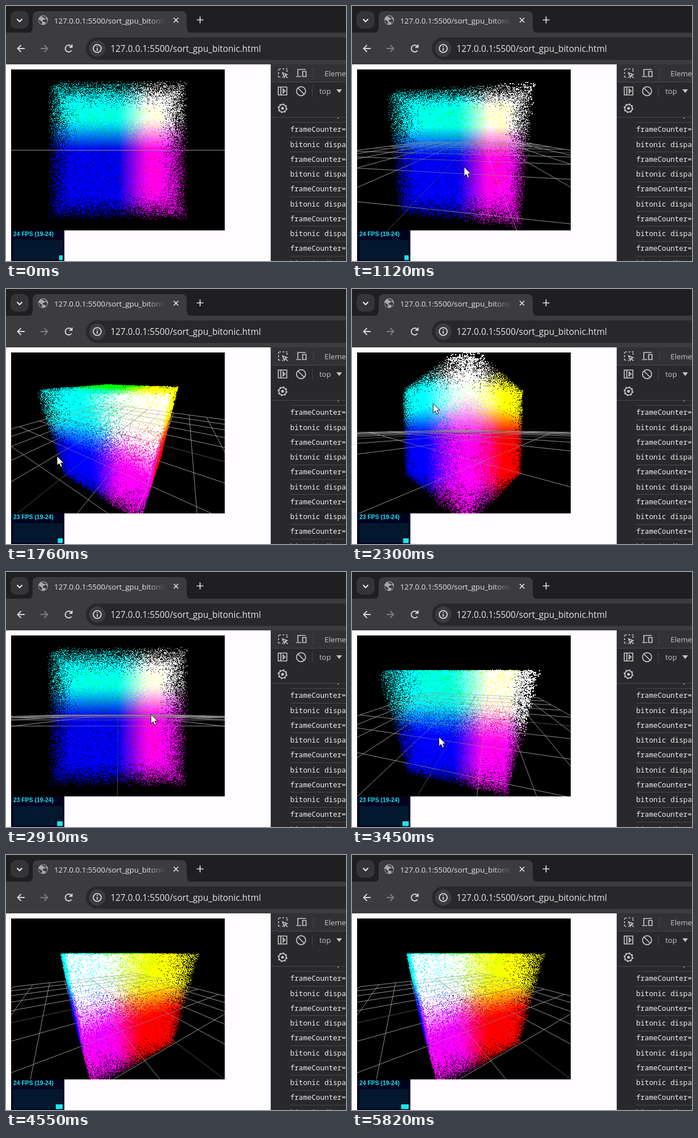
Recreate the animation shown at these times as an HTML page with a canvas. Size 600x450 px, loop 5880 ms.

```html
<!DOCTYPE html>
<html lang="en">
<head>
<meta charset="utf-8">
<title>Bitonic sort</title>
<style>
html, body { margin: 0; width: 100%; height: 100%; overflow: hidden; background: #fffdff; }
svg, canvas { position: absolute; left: 0; top: 0; }
#view { left: 9px; top: 112px; }
text { font-family: "Open Sans", "Noto Sans", sans-serif; fill: #e6e6e8; white-space: pre; }
.mono { font: 500 12.6px "Noto Sans Mono", "DejaVu Sans Mono", monospace; fill: #f0f0f2; }
.line { fill: none; stroke: #c7c7c9; stroke-width: 1.7; }
.rule { stroke: #48484b; stroke-width: 1; }
#fps { font: bold 10.4px "Liberation Sans", Arial, sans-serif; fill: #1de4ea; }
</style>
</head>
<body>
<svg width="600" height="450">
  <defs>
    <linearGradient id="fade" gradientUnits="userSpaceOnUse" x1="250" x2="281" y1="0" y2="0">
      <stop stop-color="#e6e6e8"/><stop offset="1" stop-color="#3c3b3d"/>
    </linearGradient>
  </defs>

  <!-- tab strip -->
  <rect width="600" height="48" fill="#1f1f21"/>
  <rect x="8" y="9" width="32" height="31" rx="10" fill="#353537"/>
  <path class="line" d="M19.5 23l4.5 4.5 4.5-4.5" style="stroke:#eee;stroke-width:2"/>
  <path d="M37 48q10 0 10-10V19q0-10 10-10H309q10 0 10 10V38q0 10 10 10z" fill="#3c3b3d"/>
  <circle cx="65.5" cy="25" r="8.5" fill="#aaabae"/>
  <path d="M58.5 24l5 4v4l-3-1-3-5zM62 18l4-.5 5 2-2 4-4 1v3l5 1-1 4 4-5-1-4" fill="#3c3b3d"/>
  <text x="85" y="30.5" font-size="13.3" style="fill:url(#fade)">127.0.0.1:5500/sort_gpu_bitonic</text>
  <path class="line" d="M296 21l8 8m0-8l-8 8M336.5 24.5h12m-6-6v12" style="stroke:#e3e3e5"/>

  <!-- toolbar -->
  <rect y="47" width="600" height="56" fill="#3c3b3d"/>
  <path class="line" d="M33 75H20.5m6-6l-6 6 6 6" style="stroke:#d9d9db;stroke-width:1.9"/>
  <path class="line" d="M61 75h12.5m-6-6l6 6-6 6" style="stroke:#7d7d80;stroke-width:1.9"/>
  <path class="line" d="M115.5 78.5a6 6 0 1 1-1-8l2 2m0-4.5v4.8h-4.8" style="stroke:#d9d9db;stroke-width:1.9"/>
  <rect x="141" y="55.5" width="520" height="39.5" rx="19.7" fill="#28282a"/>
  <circle cx="161" cy="75" r="14.5" fill="#3c3b3d"/>
  <circle class="line" cx="161" cy="75" r="7" style="stroke:#e3e3e5"/>
  <path class="line" d="M161 74v5m0-8.5v1.8" style="stroke:#e3e3e5"/>
  <text x="184.5" y="81" font-size="15.4">127.0.0.1:5500/sort_gpu_bitonic.html</text>

  <!-- developer panel -->
  <rect x="467" y="103" width="133" height="347" fill="#29292b"/>
  <g id="log"></g>
  <rect x="468" y="103" width="132" height="93" fill="#29292b"/>
  <rect x="468" y="103" width="132" height="31" fill="#323234"/>
  <path class="rule" d="M467.5 103V450M468 134.5H600M468 196.5H600M542.5 109v19M540.5 141v19"/>
  <path class="line" d="M496 116v-5h-2m-3 0h-3m-3 0h-4v3m0 3v3m0 3v3h3m3 0h2" stroke-dasharray="3 1.5"/>
  <path class="line" d="M488 118l3 8 1.5-3.5 3.5-1.5zM492 122l5 5"/>
  <path class="line" d="M515 123v-11h14M512 124.5h9M523.5 115.5h6v9h-6z"/>
  <path class="line" d="M480.5 143h15v14h-15zM485 143v14M489 146.5l3.5 3.5-3.5 3.5z"/>
  <path class="line" d="M515 144.5l11.5 11.5"/>
  <circle class="line" cx="520.7" cy="150.3" r="8"/>
  <circle class="line" cx="488" cy="180.5" r="6.5"/>
  <circle class="line" cx="488" cy="180.5" r="7.7" stroke-dasharray="3 3.05"/>
  <circle cx="488" cy="180.5" r="2.5" fill="#c7c7c9"/>
  <text x="562" y="123.5" font-size="13.3" style="fill:#c7c7c9">Elements</text>
  <text x="553" y="155" font-size="13" style="fill:#c7c7c9">top</text>
  <path d="M583 147h10l-5 6.5z" fill="#c7c7c9"/>

  <!-- frame rate panel -->
  <rect x="9" y="395" width="94" height="55" fill="#020220"/>
  <text id="fps" x="13" y="406.3"></text>
  <rect x="13" y="413" width="87" height="35" fill="#03172f"/>
  <rect id="bar" y="440" height="8.5" fill="#1de4ea"/>
</svg>
<canvas id="view" width="377" height="284"></canvas>
<svg width="600" height="450">
  <path id="cursor" d="M0 0V16.5L3.8 13 6.5 19 9.3 17.8 6.7 12H11.8Z" fill="#fff" stroke="#111" stroke-width="1"/>
</svg>
<script>
const LOOP = 5880, W = 377, H = 284, CX = 188.5, CY = 142.5;
const FOCAL = H / 2 / Math.tan(37.5 * Math.PI / 180), DIST = 5, HALF = 2, COUNT = 262144;
const $ = id => document.getElementById(id);

// time, yaw, elevation (degrees)
const orbit = [
  [820, 0, 0], [1120, 8, 8.5], [1420, 18, 18], [1760, 30, 27.5], [2000, 37, 21],
  [2300, 43.4, 2.9], [2500, 38, 0.5], [2640, 21, 0.5], [2910, 0, 1.3],
  [3210, 3, 15], [3500, 15, 25], [4000, 45, 25], [4420, 61.5, 24]
];
// time, x, y
const pointer = [
  [820, 215, 258], [1120, 198, 284], [1760, 90, 295], [2000, 95, 285], [2300, 143, 202],
  [2600, 210, 205], [2910, 256, 251], [3210, 200, 285], [4000, 47, 305], [4420, 14, 305]
];

function sample(keys, t) {
  const i = keys.findIndex(k => k[0] > t);
  if (i < 0) return keys[keys.length - 1].slice(1);
  if (i === 0) return keys[0].slice(1);
  const a = keys[i - 1], b = keys[i], u = (t - a[0]) / (b[0] - a[0]);
  return [1, 2].map(n => a[n] + (b[n] - a[n]) * u);
}

// random points in a cube, coloured by clamped position
let seed = 7;
const random = () => (seed = (Math.imul(seed, 1664525) + 1013904223) >>> 0) / 4294967296;
const pos = Float32Array.from({ length: COUNT * 3 }, () => (random() * 2 - 1) * HALF);
const level = v => Math.round(Math.min(1, Math.max(0, v)) * 255);
const tint = Uint32Array.from({ length: COUNT }, (_, i) =>
  (255 << 24 | level(pos[i * 3 + 2]) << 16 | level(pos[i * 3 + 1]) << 8 | level(pos[i * 3])) >>> 0);

const ctx = $("view").getContext("2d");
const layer = document.createElement("canvas");
layer.width = W;
layer.height = H;
const layerCtx = layer.getContext("2d");
const image = layerCtx.createImageData(W, H);
const pixels = new Uint32Array(image.data.buffer);
const zbuf = new Float32Array(W * H);

function drawPoints(sy, cy, se, ce) {
  pixels.fill(0);
  zbuf.fill(99);
  for (let i = 0, j = 0; i < COUNT; i++, j += 3) {
    const x = pos[j], y = pos[j + 1], z = pos[j + 2];
    const f = x * sy + z * cy, depth = DIST - f * ce - y * se, k = FOCAL / depth;
    const size = depth < 2.6 ? 2 : 1;
    const px = Math.floor(CX + (x * cy - z * sy) * k);
    const py = Math.floor(CY - (y * ce - f * se) * k);
    for (let v = py; v < py + size; v++) {
      if (v < 0 || v >= H) continue;
      for (let u = px; u < px + size; u++) {
        const n = v * W + u;
        if (u >= 0 && u < W && depth < zbuf[n]) {
          zbuf[n] = depth;
          pixels[n] = tint[i];
        }
      }
    }
  }
  layerCtx.putImageData(image, 0, 0);
}

function drawGrid(g, sy, cy, se, ce) {
  const toCamera = (x, z) => {
    const f = x * sy + z * cy;
    return [x * cy - z * sy, -f * se, DIST - f * ce];
  };
  const segment = (a, b) => {
    if (a[2] > b[2]) [a, b] = [b, a];
    const near = 0.05;
    if (b[2] <= near) return;
    if (a[2] < near) {
      const u = (near - a[2]) / (b[2] - a[2]);
      a = a.map((v, i) => v + (b[i] - v) * u);
    }
    g.beginPath();
    for (const p of [a, b]) g.lineTo(CX + p[0] * FOCAL / p[2], CY - p[1] * FOCAL / p[2]);
    g.stroke();
  };
  for (let i = -5; i <= 5; i++) {
    g.strokeStyle = i ? "#929292" : "#4c4c4c";
    segment(toCamera(i, -5), toCamera(i, 5));
    segment(toCamera(-5, i), toCamera(5, i));
  }
}

function drawScene(yaw, tilt) {
  const view = [Math.sin(yaw), Math.cos(yaw), Math.sin(tilt), Math.cos(tilt)];
  ctx.fillStyle = "#000";
  ctx.fillRect(0, 0, W, H);
  drawGrid(ctx, ...view);
  drawPoints(...view);
  // the grid shows faintly through the cloud
  layerCtx.globalCompositeOperation = "source-atop";
  layerCtx.globalAlpha = 0.55;
  drawGrid(layerCtx, ...view);
  ctx.drawImage(layer, 0, 0);
}

let log = "";
for (let i = 0; i < 11; i++) {
  const y = 196 + i * 26.25;
  log += `<text class="mono" x="501.5" y="${y}">${i % 2 ? "frameCounter=" : "bitonic dispatch"}</text>` +
    `<path class="rule" d="M502 ${Math.round(y + 8.5) + 0.5}H600"/>`;
}
$("log").innerHTML = log;

const start = performance.now();
let lastPose = "";
function draw() {
  const t = (performance.now() - start) % LOOP;
  const pose = sample(orbit, t);
  if (pose.join() !== lastPose) {
    lastPose = pose.join();
    drawScene(...pose.map(d => d * Math.PI / 180));
  }

  const [x, y] = sample(pointer, t);
  $("cursor").setAttribute("transform", `translate(${x} ${y})`);
  $("cursor").style.display = t >= 820 && t < 4440 ? "" : "none";

  $("fps").textContent = `${t > 1400 && t < 3850 ? 23 : 24} FPS (19-24)`;
  const width = 6.3 + 1.16 * Math.round(t / 1000 * 1.1);
  $("bar").setAttribute("x", 100 - width);
  $("bar").setAttribute("width", width);
  requestAnimationFrame(draw);
}
draw();
</script>
</body>
</html>
```
